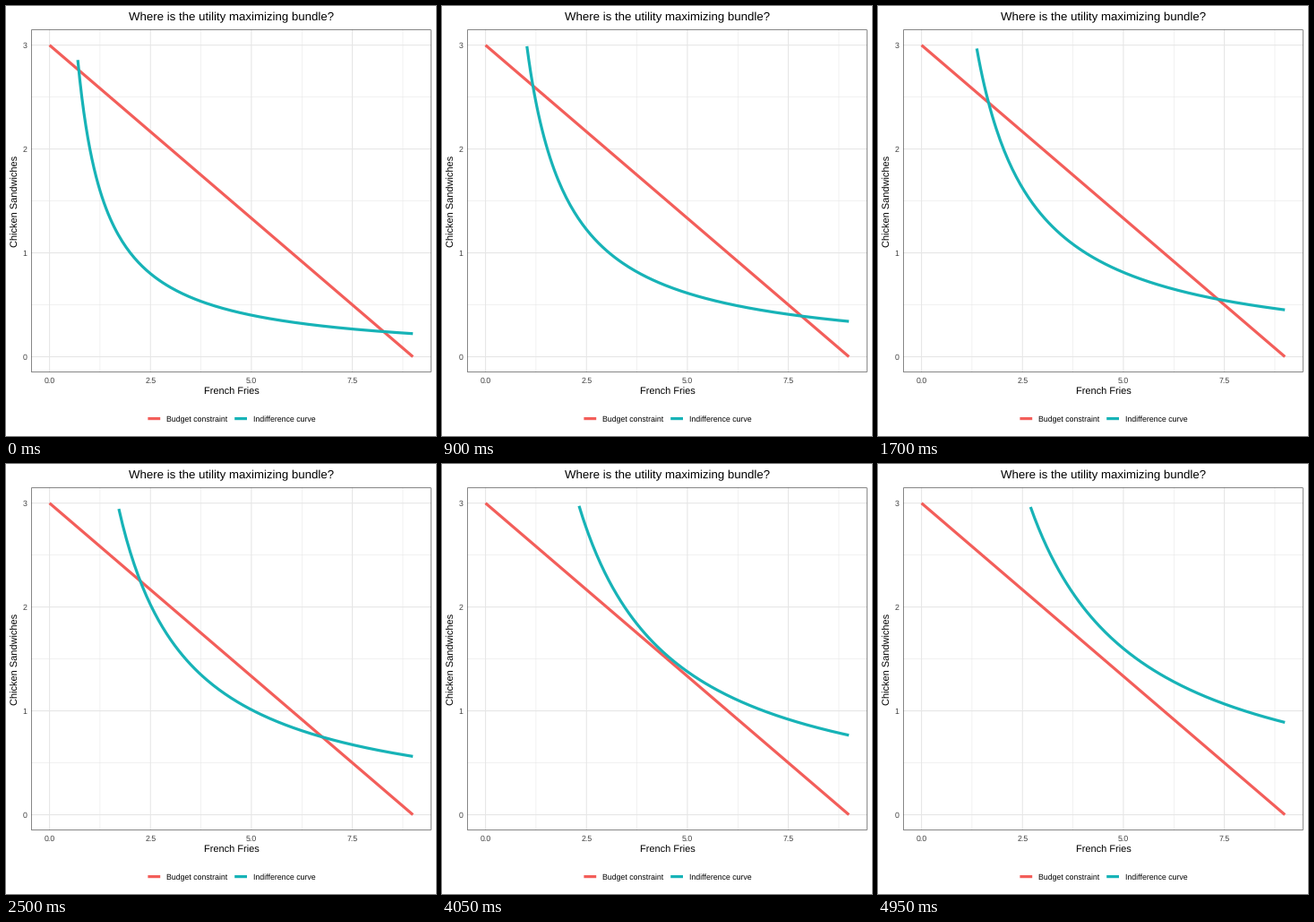
A matplotlib script for the animation above (5000 ms loop, 480x480 px).

```python
import math

import matplotlib.pyplot as plt
import numpy as np
from matplotlib.animation import FuncAnimation
from matplotlib.patches import Rectangle

SIZE = 480
FRAMES = 100
STEP = 0.05
LEFT, TOP, RIGHT, BOTTOM = 28.3, 26.3, 474.5, 408.9
CORAL, TEAL = "#F35E5A", "#17B3B7"
GRID, BORDER, TICK_TEXT = "#E6E6E6", "#222222", "#404040"

# Each level of utility is reached on a whole frame.
LEVELS = np.arange(2, 8.25, 0.5)
KEYS = [round(1 + (FRAMES - 1) * (k - 2) / 6) - 1 for k in LEVELS]

plt.rcParams["font.family"] = "Liberation Sans"
plt.rcParams["text.hinting"] = "none"
plt.rcParams["text.kerning_factor"] = 6

# At 72 dpi one point is one pixel, so all sizes below are pixels.
fig = plt.figure(figsize=(SIZE / 72, SIZE / 72), dpi=72, facecolor="white")
ax = fig.add_axes([0, 0, 1, 1])
ax.set_xlim(0, SIZE)
ax.set_ylim(SIZE, 0)
ax.axis("off")


def px(x):
    return LEFT + (np.asarray(x) + 0.45) * (RIGHT - LEFT) / 9.9


def py(y):
    return BOTTOM - (np.asarray(y) + 0.15) * (BOTTOM - TOP) / 3.3


def line(xs, ys, color, width, z):
    return ax.plot(xs, ys, color=color, lw=width, zorder=z, snap=False,
                   solid_capstyle="butt", solid_joinstyle="round")[0]


def label(x, y, text, size, color="black", ha="center", angle=0):
    ax.text(x, y, text, fontsize=size, color=color, ha=ha, va="baseline",
            rotation=angle, rotation_mode="anchor", zorder=6)


def draw_grid():
    for x in (1.25, 3.75, 6.25, 8.75):
        line([px(x)] * 2, [TOP, BOTTOM], GRID, 0.53, 1)
    for y in (0.5, 1.5, 2.5):
        line([LEFT, RIGHT], [py(y)] * 2, GRID, 0.53, 1)
    for x in (0, 2.5, 5, 7.5):
        line([px(x)] * 2, [TOP, BOTTOM], GRID, 1.07, 2)
        label(px(x), 421, f"{x:.1f}", 8.8, TICK_TEXT)
    for y in range(4):
        line([LEFT, RIGHT], [py(y)] * 2, GRID, 1.07, 2)
        label(23.2, py(y) + 3.2, str(y), 8.8, TICK_TEXT, "right")
    # Only the inner half of the border's stroke is visible.
    inset = 0.27
    ax.add_patch(Rectangle((LEFT + inset, TOP + inset),
                           RIGHT - LEFT - 2 * inset, BOTTOM - TOP - 2 * inset,
                           fill=False, ec=BORDER, lw=2 * inset, snap=False,
                           joinstyle="miter", zorder=5))


def draw_legend():
    for x, color, text in ((158.4, CORAL, "Budget constraint"),
                           (255.2, TEAL, "Indifference curve")):
        line([x, x + 13.8], [460.6, 460.6], color, 3.2, 4)
        label(x + 21, 464, text, 8.8, ha="left")


def hyperbola(k):
    """Sampled points of x * y = k with y at most 3 and x up to 9."""
    first = math.ceil(k / 3 / STEP - 1e-9)
    x = np.arange(first, round(9 / STEP) + 1) * STEP
    return np.column_stack([x, k / x])


def pad(path, count):
    """Add points by halving the longest segments, which come first."""
    extra = count - len(path)
    if extra <= 0:
        return path
    mids = (path[:extra] + path[1:extra + 1]) / 2
    return np.insert(path, np.arange(1, extra + 1), mids, axis=0)


def curve_at(frame):
    i = min(np.searchsorted(KEYS, frame, side="right"), len(KEYS) - 1) - 1
    start, end = hyperbola(LEVELS[i]), hyperbola(LEVELS[i + 1])
    count = max(len(start), len(end))
    start, end = pad(start, count), pad(end, count)
    return start + (end - start) * (frame - KEYS[i]) / (KEYS[i + 1] - KEYS[i])


def update(frame):
    x, y = curve_at(frame).T
    curve.set_data(px(x), py(y))
    return [curve]


draw_grid()
draw_legend()
label(251.4, 16, "Where is the utility maximizing bundle?", 13.2)
label(251.4, 433.6, "French Fries", 11)
label(14.3, 217.6, "Chicken Sandwiches", 11, angle=90)
line(px([0, 9]), py([3, 0]), CORAL, 3.2, 3)
curve = line([], [], TEAL, 3.2, 4)

anim = FuncAnimation(fig, update, frames=FRAMES, interval=50,
                     repeat=True, repeat_delay=0)
plt.show()
```
